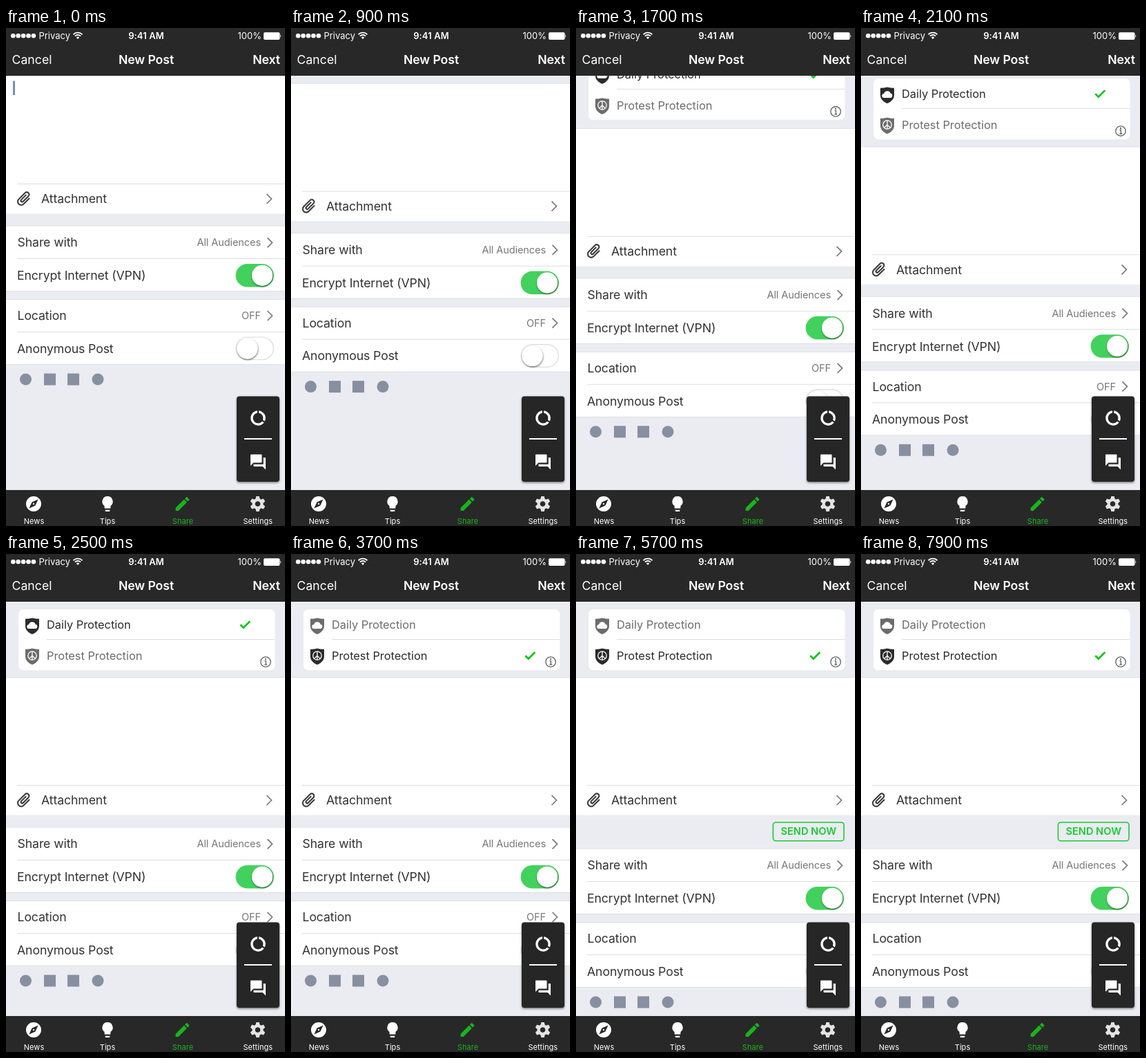
Recreate the animation shown at these times as an HTML page. Size 404 by 720 pixels, loop 8000 ms.

```html
<!DOCTYPE html>
<html lang="en">
<head>
<meta charset="utf-8">
<title>New Post</title>
<style>
  html, body { margin: 0; width: 100%; height: 100%; overflow: hidden; background: #ebebf2; }
  svg { display: block; width: 100%; height: 100%; font-family: Inter, Roboto, sans-serif; }
  .row { font-size: 17.7px; letter-spacing: -.12px; fill: #333; }
  .value { font-size: 14.6px; letter-spacing: -.12px; fill: #777; text-anchor: end; }
  .option { font-size: 16.4px; letter-spacing: -.02px; }
  .status { font-size: 13px; fill: #fff; }
  .bar { font-size: 17.7px; fill: #fff; }
  .bold { font-weight: 600; letter-spacing: -.1px; }
  .tab { font-size: 11px; letter-spacing: .05px; text-anchor: middle; fill: #fff; }
  .edge { stroke: #dedee3; }
  .chevron { fill: none; stroke: #7a7a7a; stroke-width: 1.7; }
  .brand { fill: #8790a1; }
</style>
</head>
<body>
<svg viewBox="0 0 404 720" xmlns="http://www.w3.org/2000/svg">
  <defs>
    <filter id="shadow" x="-30%" y="-30%" width="160%" height="160%">
      <feDropShadow dx="0" dy="1.5" stdDeviation="1.7" flood-opacity=".5"/>
    </filter>
    <filter id="knob-shadow" x="-30%" y="-30%" width="160%" height="160%">
      <feDropShadow dx=".4" dy="1.2" stdDeviation="1" flood-opacity=".65"/>
    </filter>
    <path id="chevron" class="chevron" d="M-3.5-7 3.5 0-3.5 7"/>
    <path id="shield" d="M-10-10.2Q-5-10.2 0-11.5Q5-10.2 10-10.2V0C10 6 5 10 0 12C-5 10-10 6-10 0Z"/>
  </defs>

  <rect width="404" height="720" fill="#ebebf2"/>

  <g id="card">
    <rect x="18" y="80" width="371.5" height="88" rx="7" fill="#fff"/>
    <path class="edge" d="M59 123.5H389.5"/>
    <g id="daily">
      <use href="#shield" x="38" y="104"/>
      <path fill="#fff" d="M33.5 108a3 3 0 0 1-.4-6a5 5 0 0 1 9.5-.6a3.4 3.4 0 0 1 .4 6.6Z"/>
      <text class="option" x="59" y="108.2">Daily Protection</text>
    </g>
    <g id="protest">
      <use href="#shield" x="38" y="148"/>
      <g fill="none" stroke="#fff" stroke-width="1.3">
        <circle cx="38" cy="147" r="6.2"/>
        <path d="M38 140.8V153.2M38 147L33.6 151.4M38 147L42.4 151.4"/>
      </g>
      <text class="option" x="59" y="152.8">Protest Protection</text>
    </g>
    <path id="check" d="M339.3 102.2L343.8 106.7L353.3 97.2" fill="none" stroke="#11c41c" stroke-width="2.7"/>
    <g fill="none" stroke="#444" stroke-width="1.1">
      <circle cx="376" cy="156" r="7.2"/>
      <path d="M374.5 154.5H376.3V160M374.2 160H378.2"/>
      <circle cx="376" cy="152" r=".5"/>
    </g>
  </g>

  <g id="compose">
    <rect y="69.5" width="404" height="199" fill="#fff"/>
    <path class="edge" d="M0 69.5H404M16 225.5H404"/>
    <rect id="caret" x="10" y="76.5" width="3" height="20.5" fill="#7390b8"/>
    <path transform="translate(26 247) rotate(45) scale(1.04) translate(-12.5 -12)" fill="#333" stroke="#333" stroke-width=".5"
      d="M16.5 6v11.5c0 2.2-1.8 4-4 4s-4-1.8-4-4V5a2.5 2.5 0 0 1 5 0v10.5c0 .6-.4 1-1 1s-1-.4-1-1V6H10v9.5a2.5 2.5 0 0 0 5 0V5c0-2.2-1.8-4-4-4S7 2.8 7 5v12.5a5.5 5.5 0 0 0 11 0V6z"/>
    <text class="row" x="51" y="253.3">Attachment</text>
    <use href="#chevron" x="381" y="247"/>
  </g>

  <g id="send">
    <rect x="285.4" y="388" width="102.6" height="26.8" rx="4" fill="none" stroke="#18cc30" stroke-width="1.6"/>
    <text x="336.8" y="406.3" text-anchor="middle" font-size="14.6" font-weight="600" fill="#18cc30">SEND NOW</text>
  </g>

  <g id="options">
    <rect y="286" width="404" height="94.5" fill="#fff"/>
    <path class="edge" d="M0 286H404M16 333.5H404M0 380.5H404"/>
    <text class="row" x="16.5" y="316.4">Share with</text>
    <text class="value" x="369" y="315.4">All Audiences</text>
    <use href="#chevron" x="382" y="310.3"/>
    <text class="row" x="16" y="364.3">Encrypt Internet (VPN)</text>
    <rect x="332.6" y="341" width="55.2" height="33.5" rx="16.75" fill="#43d15e"/>
    <circle cx="371" cy="357.7" r="15" fill="#fff" filter="url(#knob-shadow)"/>

    <rect y="392.5" width="404" height="94" fill="#fff"/>
    <path class="edge" d="M0 392.5H404M16 439.5H404M0 486.5H404"/>
    <text class="row" x="16.5" y="422.3">Location</text>
    <text class="value" x="369" y="421.3">OFF</text>
    <use href="#chevron" x="382" y="416"/>
    <text class="row" x="16" y="469.8">Anonymous Post</text>
    <rect x="333.3" y="447" width="54" height="32.5" rx="16.25" fill="#fff" stroke="#dcdcdc" stroke-width="1.2"/>
    <circle cx="349.5" cy="463.4" r="15" fill="#fff" filter="url(#knob-shadow)"/>

    <g class="brand">
      <circle cx="28.5" cy="508" r="8.5"/>
      <rect x="55" y="499.5" width="17" height="17"/>
      <rect x="89" y="499.5" width="17" height="17"/>
      <circle cx="133" cy="508" r="8.5"/>
    </g>
  </g>

  <rect x="334" y="532.5" width="62" height="123.5" rx="4" fill="#262626" filter="url(#shadow)"/>
  <path d="M345 594H385" stroke="#fff" stroke-width="2"/>
  <path transform="translate(365 564) scale(1.08) translate(-12 -12)" fill="#fff"
    d="M13 2v3.1a7 7 0 0 1 5.5 9.4l2.6 1.6A10 10 0 0 0 13 2zM12 19a7 7 0 0 1-1-13.9V2a10 10 0 1 0 9.1 15.9l-2.6-1.5A7 7 0 0 1 12 19z"/>
  <path transform="translate(365 627.5) scale(1.1) translate(-12 -12)" fill="#fff"
    d="M21 6h-2v9H6v2c0 .6.4 1 1 1h11l4 4V7c0-.6-.4-1-1-1zm-4 6V3c0-.6-.4-1-1-1H3c-.6 0-1 .4-1 1v14l4-4h10c.6 0 1-.4 1-1z"/>

  <rect width="404" height="69" fill="#282828"/>
  <g id="signal" fill="#fff"></g>
  <text class="status" x="47.5" y="15.8">Privacy</text>
  <g fill="none" stroke="#fff" stroke-width="1.9">
    <path d="M97.5 9.3A9.2 9.2 0 0 1 110.5 9.3M99.9 11.7A5.8 5.8 0 0 1 108.1 11.7"/>
    <path d="M104 16L101.8 13.7A3.1 3.1 0 0 1 106.2 13.7Z" fill="#fff" stroke="none"/>
  </g>
  <text class="status" x="203" y="15.8" text-anchor="middle" font-weight="600" letter-spacing=".1">9:41 AM</text>
  <text class="status" x="370" y="15.8" text-anchor="end">100%</text>
  <rect x="373" y="6.3" width="23.5" height="10.6" rx="2" fill="#fff"/>
  <path d="M397.3 9.4Q399.2 11.6 397.3 13.8Z" fill="#fff"/>
  <text class="bar" x="8.5" y="51.8">Cancel</text>
  <text class="bar bold" x="203" y="51.8" text-anchor="middle">New Post</text>
  <text class="bar bold" x="397" y="51.8" text-anchor="end">Next</text>

  <rect y="668" width="404" height="52" fill="#282828"/>
  <path transform="translate(40 688) scale(1.1) translate(-12 -12)" fill="#fff" fill-rule="evenodd"
    d="M12 10.9a1.1 1.1 0 1 0 0 2.2a1.1 1.1 0 1 0 0-2.2zM12 2a10 10 0 1 0 0 20a10 10 0 1 0 0-20zM14.2 14.2L6 18l3.8-8.2L18 6z"/>
  <path transform="translate(147 688) scale(1.1) translate(-12 -12)" fill="#fff"
    d="M9 21c0 .6.4 1 1 1h4c.6 0 1-.4 1-1v-1H9zM12 2a7 7 0 0 0-4 12.7V17c0 .6.4 1 1 1h6c.6 0 1-.4 1-1v-2.3A7 7 0 0 0 12 2z"/>
  <path transform="translate(255.5 688) scale(1.1) translate(-12 -12)" fill="#18b41c"
    d="M3 17.2V21h3.8L17.8 9.9l-3.7-3.7zM20.7 7c.4-.4.4-1 0-1.4l-2.3-2.3c-.4-.4-1-.4-1.4 0l-1.9 1.8 3.8 3.8z"/>
  <g id="gear" transform="translate(364.5 688)" fill="#e4e4e4">
    <circle r="5.9" fill="none" stroke="#e4e4e4" stroke-width="4.2"/>
  </g>
  <text class="tab" x="40.5" y="716.6">News</text>
  <text class="tab" x="147" y="716.6">Tips</text>
  <text class="tab" x="256" y="716.6" style="fill:#18b41c">Share</text>
  <text class="tab" x="364.8" y="716.6">Settings</text>
</svg>
<script>
  const LOOP = 8000, STEP = 100;
  const PULL = 109;   // distance the page is pulled down
  const GAP = 31;     // room opened for the send button

  const $ = id => document.getElementById(id);
  const clamp = u => Math.min(1, Math.max(0, u));
  const progress = (t, start, end) => clamp((t - start) / (end - start));
  const ease = u => (1 - Math.cos(Math.PI * u)) / 2;
  const moveY = (id, y) => $(id).setAttribute('transform', `translate(0 ${y.toFixed(2)})`);
  const show = (id, opacity) => $(id).setAttribute('opacity', opacity);

  function add(parent, tag, attrs) {
    const el = document.createElementNS('http://www.w3.org/2000/svg', tag);
    for (const key in attrs) el.setAttribute(key, attrs[key]);
    $(parent).append(el);
  }

  for (let i = 0; i < 5; i++) add('signal', 'circle', { cx: 10.3 + i * 7.4, cy: 11.3, r: 3.3 });
  for (let i = 0; i < 6; i++) {
    add('gear', 'path', { d: 'M-3.2-6.5L-2.2-11H2.2L3.2-6.5Z', transform: `rotate(${i * 60})` });
  }

  function render(t) {
    const pull = PULL * ease(progress(t, 520, 2400));
    const gap = GAP * ease(progress(t, 4142, 5242));
    const protest = t >= 3500;

    moveY('card', (pull - PULL) * 1.06);
    moveY('compose', pull);
    moveY('options', pull + gap);
    moveY('check', protest ? 44.8 : 0);
    $('daily').setAttribute('fill', protest ? '#6c6c6c' : '#2b2b2b');
    $('protest').setAttribute('fill', protest ? '#2b2b2b' : '#6c6c6c');
    show('caret', t < 500 ? 1 : 0);
    show('send', progress(t, 5000, 5400));
  }

  const begin = performance.now();
  function tick() {
    const t = (performance.now() - begin) % LOOP;
    render(Math.floor(t / STEP) * STEP);
    requestAnimationFrame(tick);
  }
  tick();
</script>
</body>
</html>
```
